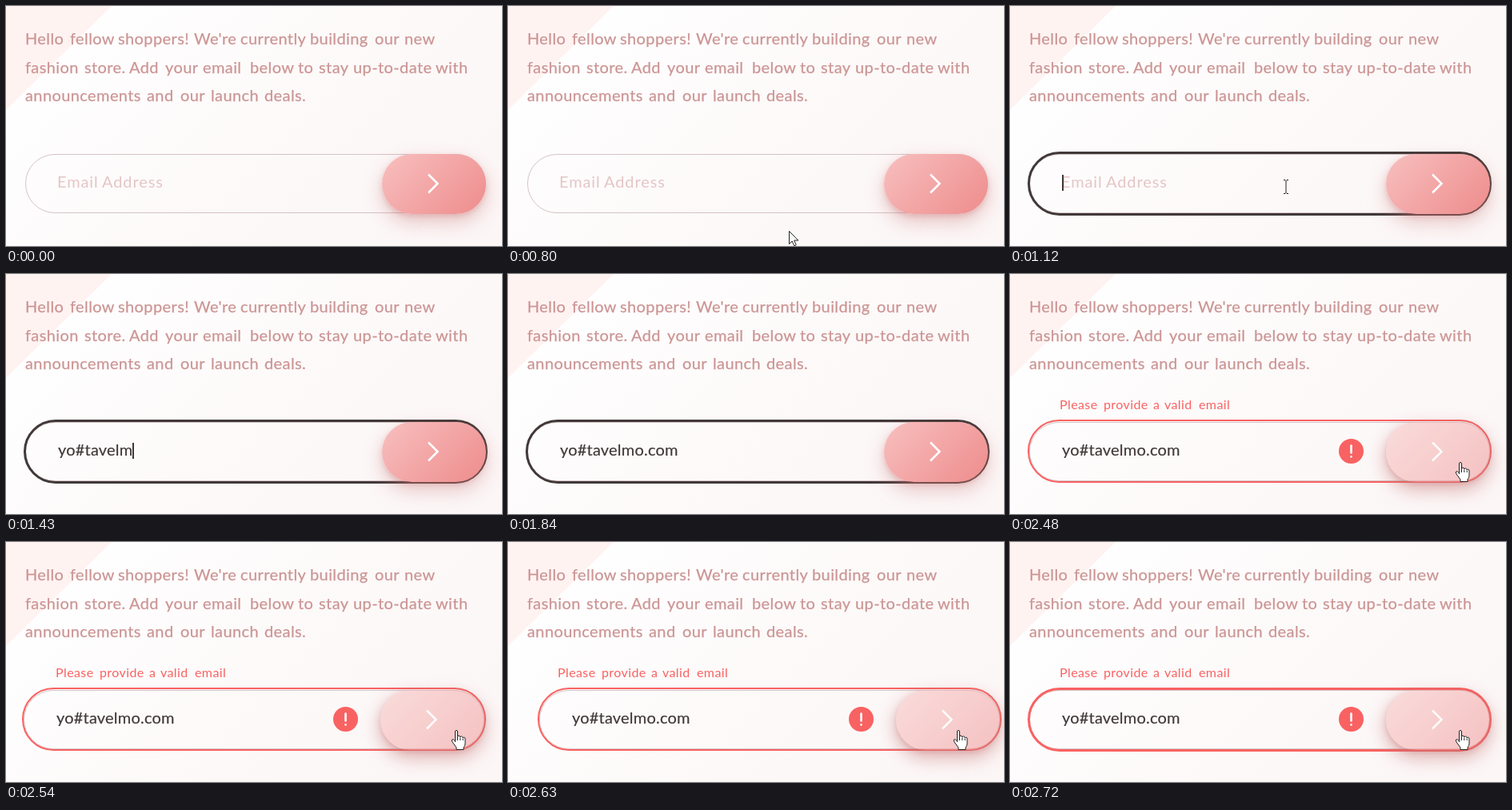
Write an HTML page that moves like this. It is 620 px wide and 300 px high and loops after 3990 ms.

```html
<!DOCTYPE html>
<html lang="en">
<head>
<meta charset="utf-8">
<title>Email sign-up</title>
<style>
  :root { --ink: #413939; --rose: #cc9594; --error: #f96262; --drop: 198, 110, 110; }
  html, body { margin: 0; width: 100%; height: 100%; overflow: hidden; }
  #stage {
    position: relative; width: 620px; height: 300px; overflow: hidden;
    background: linear-gradient(135deg, #fff 10%, #fdfafa 45%, #fcf6f6);
    font: 20px/24px Lato, sans-serif;
  }
  #stage div, svg { position: absolute; }
  svg { left: 0; top: 0; width: 620px; height: 300px; }
  text { white-space: pre; letter-spacing: .4px; }
  .copy { fill: var(--rose); stroke: var(--rose); stroke-width: .25px; }
  .hint { fill: #e5c5c5; letter-spacing: .9px; }
  .warn { fill: var(--error); font-size: 16px; }

  .loop { animation: 3990ms step-end infinite; }
  .field { inset: 0; animation-name: shake; }
  .box {
    left: 24px; top: 185px; width: 576px; height: 74px; box-sizing: border-box;
    border: 1px solid #d5c3c6; border-radius: 37px;
  }
  .ring {
    left: 22px; top: 182px; width: 580px; height: 80px; box-sizing: border-box;
    border: 3px solid transparent; border-radius: 40px; animation-name: ring;
  }
  .entry {
    left: 65px; top: 207px; white-space: nowrap; color: var(--ink);
    letter-spacing: .2px; -webkit-text-stroke: .2px var(--ink);
  }
  .caret {
    display: inline-block; width: 2px; height: 20px; vertical-align: -4px;
    background: var(--ink); opacity: 0; animation-name: caret;
  }
  .shade, .glow, .button {
    left: 470px; top: 185px; width: 130px; height: 75px; border-radius: 37.5px;
  }
  .shade { box-shadow: 0 3px 6px rgba(var(--drop), .28), 0 10px 24px rgba(var(--drop), .38); }
  .glow { box-shadow: 0 6px 20px rgba(var(--drop), .22); animation-name: glow; }
  .button { background: linear-gradient(135deg, #f8bfbf, #ee8c8c); animation-name: fade; }
  .button svg { width: 130px; height: 75px; }
  #stage .glow, #stage .button { animation-timing-function: linear; }
  .error { opacity: 0; animation-name: error; }
  .pointer { animation-name: move; }
  .arrow, .beam, .hand { opacity: 0; }
  .arrow { animation-name: arrow; }
  .beam { animation-name: beam; }
  .hand { animation-name: hand; }

  @keyframes ring {
    0% { border-color: transparent; }
    25.31% { border-color: var(--ink); border-width: 3px; height: 80px; }
    62.15% { border-color: var(--error); border-width: 2px; height: 79px; }
    68.16%, 100% { border-color: var(--error); border-width: 3px; height: 80px; }
  }
  @keyframes caret { 0%, 46.11%, 100% { opacity: 0; } 25.31% { opacity: 1; } }
  @keyframes error { 0% { opacity: 0; } 62.15%, 100% { opacity: 1; } }
  @keyframes glow { 0%, 50.3% { opacity: 0; } 53.13%, 100% { opacity: 1; } }
  @keyframes fade { 0%, 50.3% { opacity: 1; } 53.13%, 100% { opacity: .5; } }
  @keyframes shake {
    0%, 62.15%, 68.16%, 100% { transform: none; }
    62.9%, 65.91% { transform: translateX(15px); }
    63.65%, 66.66% { transform: translateX(-2px); }
    64.41%, 67.41% { transform: translateX(-14px); }
    65.16% { transform: translateX(1px); }
  }
  @keyframes move {
    0%, 20.05% { transform: translate(351px, 281px); animation-timing-function: steps(7); }
    25.31%, 46.86% { transform: translate(345px, 226px); animation-timing-function: steps(8); }
    53.13%, 100% { transform: translate(563px, 235px); }
  }
  @keyframes arrow { 0%, 22.3%, 100% { opacity: 0; } 20.05% { opacity: 1; } }
  @keyframes beam {
    0%, 29.82%, 50.77%, 100% { opacity: 0; }
    22.3%, 46.86% { opacity: 1; }
  }
  @keyframes hand { 0% { opacity: 0; } 50.77%, 100% { opacity: 1; } }
</style>
</head>
<body>
<div id="stage">
  <svg>
    <path d="M0 0H132L0 130Z" fill="#fff3f2"/>
    <g class="copy">
      <text y="48"><tspan x="24">Hello </tspan><tspan x="80">fellow </tspan><tspan x="140">shoppers! </tspan><tspan x="235">We're </tspan><tspan x="293">currently </tspan><tspan x="380">building </tspan><tspan x="461">our </tspan><tspan x="498">new</tspan></text>
      <text y="84"><tspan x="24">fashion </tspan><tspan x="98">store. </tspan><tspan x="154">Add </tspan><tspan x="199">your </tspan><tspan x="246">email </tspan><tspan x="305">below </tspan><tspan x="365">to </tspan><tspan x="391">stay </tspan><tspan x="434">up-to-date </tspan><tspan x="537">with</tspan></text>
      <text y="119"><tspan x="24">announcements </tspan><tspan x="176">and </tspan><tspan x="218">our </tspan><tspan x="256">launch </tspan><tspan x="323">deals.</tspan></text>
    </g>
    <text class="warn error loop" y="169"><tspan x="62">Please </tspan><tspan x="117">provide </tspan><tspan x="179">a </tspan><tspan x="193">valid </tspan><tspan x="236">email</tspan></text>
  </svg>

  <div class="field loop">
    <div class="box"></div>
    <div class="ring loop"></div>
    <svg>
      <text id="hint" class="hint" y="227"><tspan x="64">Email </tspan><tspan x="120">Address</tspan></text>
      <g class="error loop">
        <circle cx="426.5" cy="221.5" r="15.5" fill="#f96262"/>
        <path d="M426.5 214.5V223.5M426.5 228.4V228.5" stroke="#fff" stroke-width="2.6" stroke-linecap="round"/>
      </g>
    </svg>
    <div class="entry"><span id="typed"></span><span class="caret loop"></span></div>
    <div class="shade"></div>
    <div class="glow loop"></div>
    <div class="button loop">
      <svg><path d="M58 25.5L69.5 37L58 48.5" fill="none" stroke="#fff" stroke-width="2.5"/></svg>
    </div>
  </div>

  <svg>
    <g class="pointer loop" stroke="#222" fill="#fff" stroke-linejoin="round">
      <path class="arrow loop" d="M.5 .5V16.5L4.2 13L6.8 18.8L9.2 17.7L6.7 12H11.8Z"/>
      <path class="beam loop" d="M-3 -8.5H-1L0 -7.5L1 -8.5H3M0 -7.5V7.5M-3 8.5H-1L0 7.5L1 8.5H3" fill="none"/>
      <path class="hand loop" d="M-1.5 15V2Q-1.5 .5 0 .5T1.5 2V8.5Q1.6 7 3 7T4.8 9Q5 7.8 6.4 7.8T8.2 10Q8.6 9 9.8 9.2T11 11V17Q11 19.5 9 22V24.5H0V22L-5 15Q-6.5 12.5 -5 11.7Q-3.8 11.2 -1.5 14M1.5 8.5V13M4.8 9.5V13M8.2 10.5V13"/>
    </g>
  </svg>
</div>
<script>
  const LOOP = 3990, TYPE_AT = 1190, KEY_GAP = 30;
  const ADDRESS = 'yo#tavelmo.com';
  const typed = document.getElementById('typed');
  const hint = document.getElementById('hint');
  const start = performance.now();

  function render() {
    const t = Math.max(0, performance.now() - start) % LOOP;
    const count = Math.max(0, Math.floor((t - TYPE_AT) / KEY_GAP) + 1);
    typed.textContent = ADDRESS.slice(0, count);
    hint.style.visibility = count ? 'hidden' : 'visible';
    requestAnimationFrame(render);
  }
  render();
</script>
</body>
</html>
```
